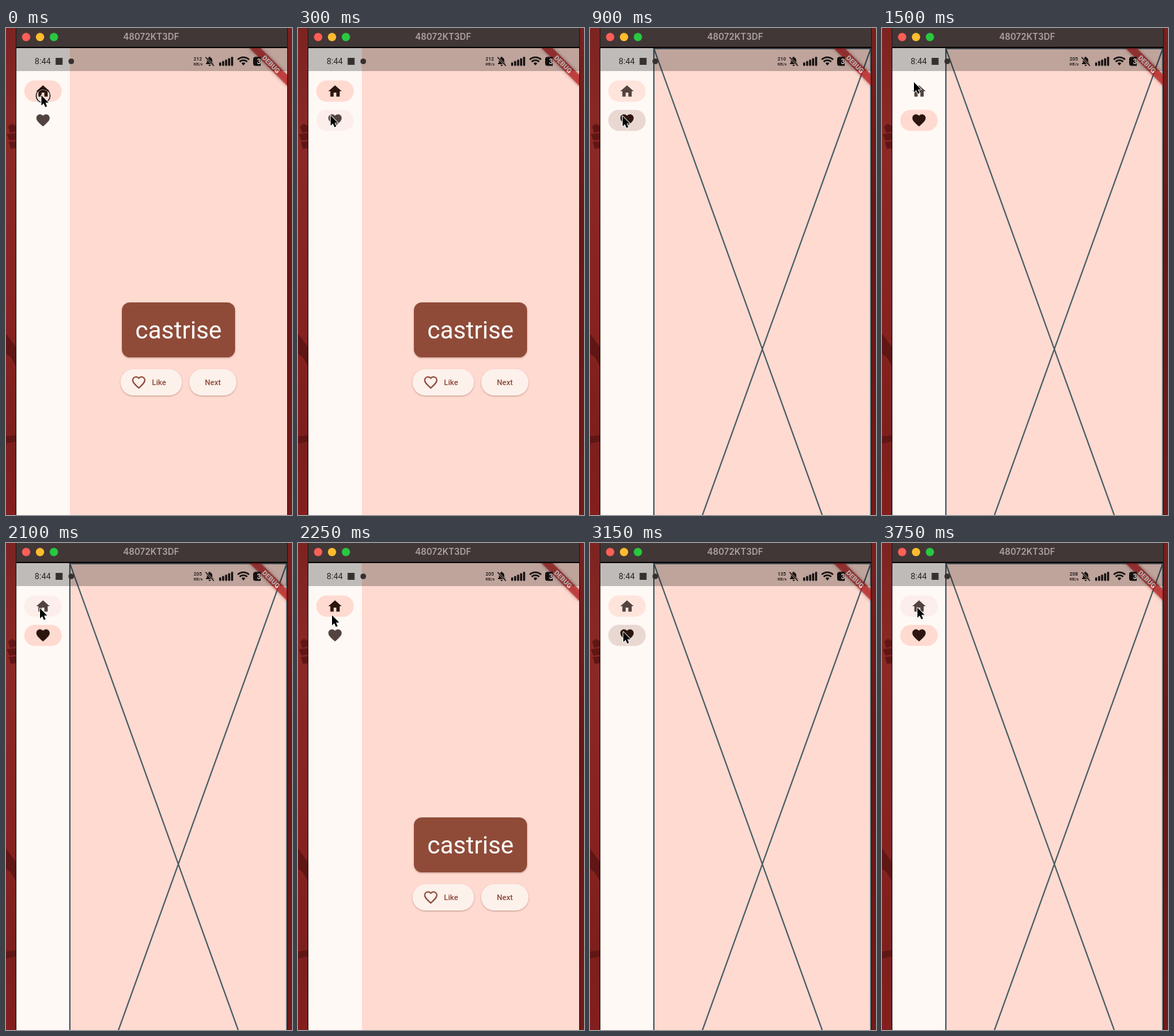
An HTML page that plays this animation: 412x701 px, repeating every 3920 ms.

```html
<!DOCTYPE html>
<html lang="en">
<head>
<meta charset="utf-8">
<title>Word app</title>
<style>
  html, body { margin: 0; width: 100%; height: 100%; overflow: hidden; background: #7b2321; }
  svg { display: block; width: 412px; height: 701px; }
  text { font-family: Roboto, "Liberation Sans", sans-serif; }
  .title { font: 600 12.5px Inter, "Open Sans", sans-serif; fill: #aca29f; }
  .label { font-size: 11px; font-weight: 500; fill: #8f4a37; }
  .net { font-weight: 700; fill: #302927; }
</style>
</head>
<body>
<svg viewBox="0 0 412 701">
  <defs>
    <linearGradient id="wall" x2="0" y2="1">
      <stop offset="0" stop-color="#7c2321"/>
      <stop offset=".22" stop-color="#8a2926"/>
      <stop offset=".6" stop-color="#86221f"/>
      <stop offset=".85" stop-color="#7c1f1d"/>
      <stop offset="1" stop-color="#831f1e"/>
    </linearGradient>
    <linearGradient id="edge" x2="0" y2="1">
      <stop offset="0" stop-color="#79211f"/>
      <stop offset=".4" stop-color="#651817"/>
      <stop offset="1" stop-color="#711b1a"/>
    </linearGradient>
    <filter id="soft" x="-20%" y="-40%" width="140%" height="180%">
      <feDropShadow dx="0" dy="1" stdDeviation=".8" flood-color="#5a2c1e" flood-opacity=".38"/>
    </filter>
    <filter id="glow" x="-20%" y="-100%" width="140%" height="300%">
      <feDropShadow dx="0" dy="0" stdDeviation="2.6" flood-color="#000" flood-opacity=".5"/>
    </filter>
    <clipPath id="screen"><rect x="15" y="29" width="390" height="672"/></clipPath>
    <path id="home" d="M10 20v-6h4v6h5v-8h3L12 3 2 12h3v8z"/>
    <path id="heart" d="M12 21.35l-1.45-1.32C5.4 15.36 2 12.28 2 8.5 2 5.42 4.42 3 7.5 3c1.74 0 3.41.81 4.5 2.09C13.09 3.81 14.76 3 16.5 3 19.58 3 22 5.42 22 8.5c0 3.78-3.4 6.86-8.55 11.54z"/>
  </defs>

  <!-- desktop -->
  <rect width="412" height="701" fill="url(#wall)"/>
  <rect x="405" width="7" height="701" fill="url(#edge)"/>
  <g fill="#5f1615">
    <path d="M3 142l5-4 7 3v8l-9 2zM1 153l14-2v10l-10 1zM4 164l11-1v10l-8 1z"/>
    <path d="M0 440l15 20v28l-8-14-7-5z"/>
    <path d="M0 588l15-2v9l-15 3z"/>
  </g>

  <!-- window -->
  <rect x="14" width="392" height="701" fill="#2b1514"/>
  <rect x="15" width="390" height="27" fill="#413736"/>
  <rect x="15" y="27" width="390" height="2" fill="#0c0808"/>
  <circle cx="29" cy="13" r="6" fill="#ff5f57"/>
  <circle cx="49" cy="13" r="6" fill="#febc2e"/>
  <circle cx="69" cy="13" r="6" fill="#28c840"/>
  <text class="title" x="209" y="17.3" text-anchor="middle">48072KT3DF</text>

  <g clip-path="url(#screen)">
    <rect x="15" y="29" width="77" height="672" fill="#fff9f6"/>
    <rect x="92" y="29" width="313" height="672" fill="#ffdad0"/>

    <!-- navigation rail -->
    <rect id="homePill" x="26.3" y="75.6" width="54" height="30.6" rx="15.3"/>
    <rect id="heartPill" x="26.3" y="117.7" width="54" height="30.6" rx="15.3"/>
    <use id="homeIcon" href="#home" transform="translate(41.8 79.5) scale(.96)"/>
    <use id="heartIcon" href="#heart" transform="translate(41.8 121.3) scale(.96)"/>

    <g id="words">
      <rect x="167" y="395" width="163" height="79" rx="11.5" fill="#8f4b38" filter="url(#soft)"/>
      <text x="248.5" y="447" text-anchor="middle" font-size="35.2" fill="#fff">castrise</text>
      <g fill="#fdf1ec" filter="url(#soft)">
        <rect x="165" y="491" width="88.5" height="38" rx="19"/>
        <rect x="264" y="491" width="68" height="38" rx="19"/>
      </g>
      <use href="#heart" transform="translate(180.8 499.6) scale(.87)" fill="none" stroke="#8f4a37" stroke-width="2.2"/>
      <text class="label" x="210.3" y="514">Like</text>
      <text class="label" x="298" y="514" text-anchor="middle">Next</text>
    </g>

    <g id="blank" fill="none" stroke="#455a64" stroke-width="1.9">
      <path d="M92 29.5H404.5V895H92zL404.5 895M404.5 29.5L92 895"/>
    </g>

    <!-- corner banner -->
    <g transform="translate(405 29) rotate(45)">
      <rect x="-39" y="26.9" width="78" height="11.5" fill="#b71c1c" fill-opacity=".7" filter="url(#glow)"/>
      <text y="36.2" text-anchor="middle" font-size="9.8" font-weight="900" fill="#fff" fill-opacity=".88">DEBUG</text>
    </g>

    <!-- status bar -->
    <rect x="15" y="29" width="390" height="33" opacity=".25"/>
    <text x="41.3" y="52.3" font-size="12" fill="#2c2726">8:44</text>
    <rect x="71.5" y="43" width="10" height="10" fill="#37302e"/>
    <circle cx="94" cy="48" r="4" fill="#37302e"/>
    <text id="rate" class="net" x="276.3" y="47" font-size="7" text-anchor="middle"></text>
    <text class="net" x="276.8" y="54" font-size="6" text-anchor="middle">KB/s</text>
    <g fill="#151110">
      <path d="M288 52v-1l1.500-1.500V46.500c0-2 1.200-3.500 2.800-4v-1h2v1c1.700.5 2.900 2 2.900 4v3l1.500 1.500v1zM291.700 53h3.400a1.700 1.700 0 0 1-3.400 0z"/>
      <path d="M287.500 42l11.500 12" stroke="#bfa49c" stroke-width="2.600"/>
      <path d="M287.500 42l12 12.500" stroke="#151110" stroke-width="1.300"/>
      <g id="bars"></g>
      <path d="M339.300 50.800a4 4 0 0 1 5.400 0L342 54z"/>
    </g>
    <path d="M333.800 45.500a11.800 11.800 0 0 1 16.400 0M336.600 48.600a7.800 7.800 0 0 1 10.800 0" fill="none" stroke="#151110" stroke-width="2.300"/>
    <path d="M367 41.500h-7.500a3.500 3.500 0 0 0-3.500 3.500v6a3.500 3.500 0 0 0 3.500 3.500H367z" fill="#151110"/>
    <text x="361.5" y="52" font-size="10" font-weight="700" fill="#d8c6c1">3</text>
  </g>

  <g id="pointer">
    <g id="ring" fill="none">
      <circle cx="2.500" cy=".5" r="9" stroke="#fff" stroke-opacity=".6"/>
      <circle cx="2.500" cy=".5" r="10" stroke="#000" stroke-width="1.200"/>
    </g>
    <path d="M0 0v14.500l3.300-3.100 2.300 5.400 2.500-1.100-2.300-5.200h4.600z" stroke="#fff" stroke-width="1.700" stroke-linejoin="round" paint-order="stroke"/>
  </g>
</svg>

<script>
const LOOP = 3920;
const el = id => document.getElementById(id);

// time, pointer x, pointer y, ring shown
const moves = [
  [0, 51, 97, 1], [150, 50, 108, 0], [300, 47, 126, 0], [450, 47, 127, 0],
  [750, 47, 127, 1], [900, 47, 127, 0], [1350, 47, 91, 0], [1500, 46, 78, 0],
  [1650, 46, 80, 0], [1800, 49, 94, 0], [1950, 49, 94, 1], [2100, 49, 94, 0],
  [2250, 49, 104, 0], [2400, 48, 120, 0], [2550, 47, 126, 0], [2700, 48, 128, 0],
  [3000, 48, 128, 1], [3150, 48, 128, 0], [3600, 52, 99, 0], [3750, 51, 93, 0]
];
const rates = [[0, 212], [450, 210], [1500, 205], [2550, 135], [3450, 208]];

// time, page, home pill, heart pill
const ON = "#ffdad0", OFF = "none", HOVER = "#fceeea", FADE = "#ffe4dc", PRESS = "#e9d8d2";
const looks = [
  [0, "home", ON, OFF], [300, "home", ON, HOVER],
  [900, "likes", FADE, PRESS], [1050, "likes", OFF, ON], [1650, "likes", HOVER, ON],
  [2250, "home", ON, OFF], [2700, "home", ON, HOVER],
  [3150, "likes", FADE, PRESS], [3300, "likes", OFF, ON], [3600, "likes", HOVER, ON]
];

const at = (steps, t) => steps.findLast(s => s[0] <= t);
const show = (id, on) => el(id).setAttribute("visibility", on ? "visible" : "hidden");
const fill = (id, color) => el(id).setAttribute("fill", color);

el("bars").innerHTML = [5, 7, 9, 11, 13].map((h, i) =>
  `<rect x="${307 + i * 4.3}" y="${54.5 - h}" width="3" height="${h}" rx="1"/>`).join("");

function draw(t) {
  const [, x, y, ring] = at(moves, t);
  const [, page, homePill, heartPill] = at(looks, t);
  const home = page === "home";
  el("pointer").setAttribute("transform", `translate(${x} ${y})`);
  show("ring", ring);
  show("words", home);
  show("blank", !home);
  fill("homePill", homePill);
  fill("heartPill", heartPill);
  fill("homeIcon", home ? "#2c150f" : "#53433f");
  fill("heartIcon", home ? "#53433f" : "#2c150f");
  el("rate").textContent = at(rates, t)[1];
}

const start = performance.now();
function tick() {
  draw((performance.now() - start) % LOOP);
  requestAnimationFrame(tick);
}
draw(0);
requestAnimationFrame(tick);
</script>
</body>
</html>
```
